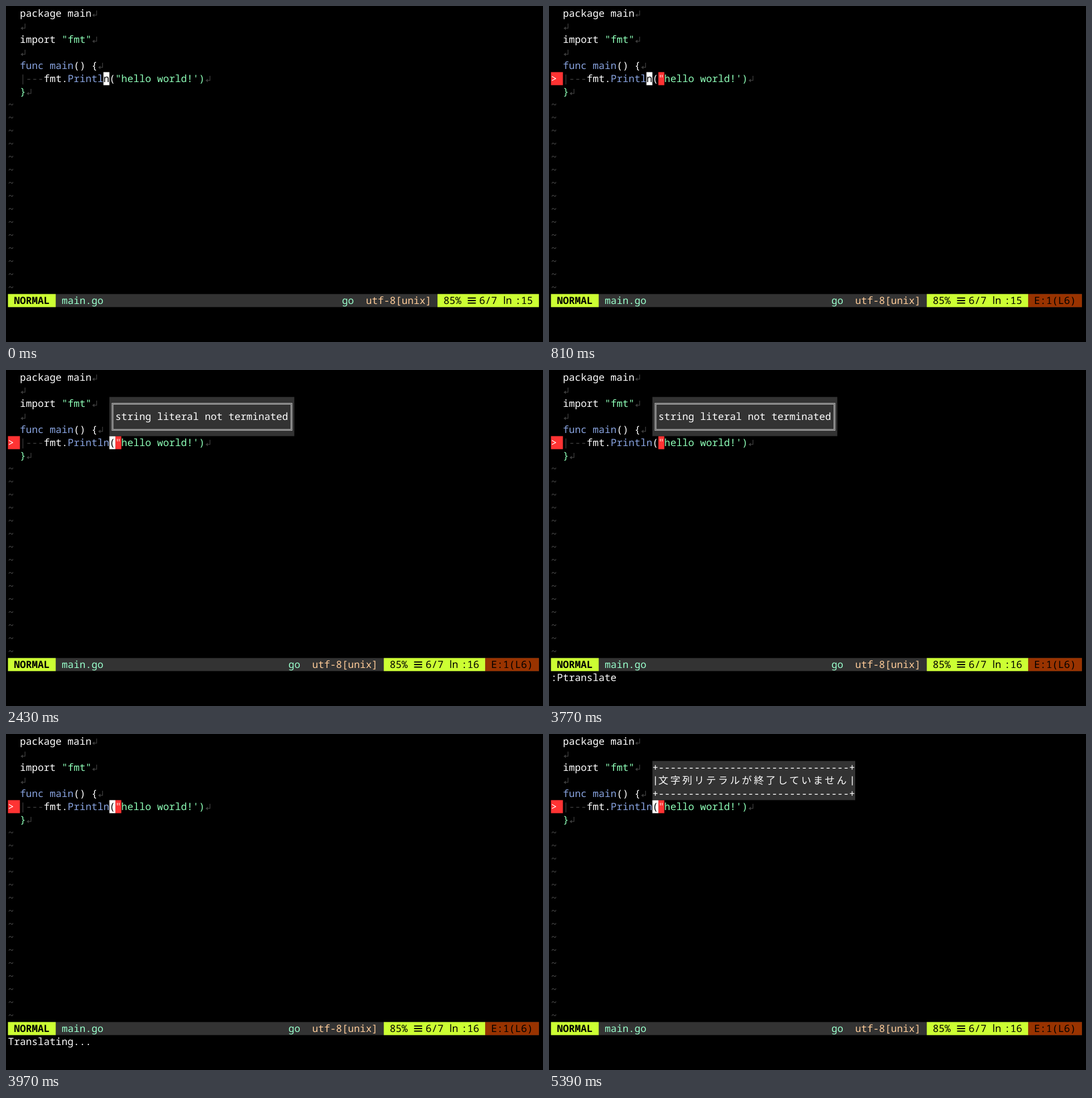
Animation, 947 px wide and 592 px high, one loop 7790 ms. Source, as an HTML page:

```html
<!DOCTYPE html>
<html lang="en">
<head>
<meta charset="utf-8">
<title>Editor popup translation</title>
<style>
  html, body { margin: 0; width: 100%; height: 100%; overflow: hidden; background: #000; }
  svg { display: block; width: 100%; height: 100%; }
  text {
    font: 17.53px "Noto Sans Mono", "DejaVu Sans Mono", monospace;
    white-space: pre;
    text-rendering: geometricPrecision;
  }
  .mode { font-weight: 600; }
  .cjk { font: 300 17.6px "Noto Sans CJK JP", "Noto Sans CJK", sans-serif; letter-spacing: 3.44px; }
  .ln { font: 18px "Noto Sans", "Open Sans", sans-serif; }
</style>
</head>
<body>
<svg id="stage" viewBox="0 0 947 592"></svg>
<script>
const LOOP = 7790;
const CELL = 10.52, ROW = 23, LEFT = 3.5, TOP = 1.5, BASE = 17.4;
const C = {
  white: '#fff', black: '#000', dim: '#3c3c3c', blue: '#88a3df', mint: '#8effb8',
  aqua: '#99ffcc', peach: '#ffcc99', lime: '#ccff33', bar: '#333', red: '#ff3333', rust: '#993300'
};
const stage = document.getElementById('stage');
const colX = c => LEFT + c * CELL;
const rowY = r => TOP + r * ROW;

function add(parent, tag, attrs, content) {
  const el = document.createElementNS('http://www.w3.org/2000/svg', tag);
  for (const k in attrs) el.setAttribute(k, attrs[k]);
  if (content) el.textContent = content;
  parent.appendChild(el);
  return el;
}
const group = (parent = stage) => add(parent, 'g', {});

function block(parent, row, col, cols, fill, rows = 1) {
  return add(parent, 'rect', {
    x: colX(col), y: rowY(row), width: cols * CELL, height: rows * ROW, fill
  });
}
function put(parent, row, col, str, fill, extra = {}) {
  return add(parent, 'text', { x: colX(col), y: rowY(row) + BASE, fill, ...extra }, str);
}
function lineEnd(row, col) {
  const x = colX(col), y = rowY(row);
  add(stage, 'path', {
    d: `M${x + 9} ${y + 6.5}v8.2h-5`, fill: 'none', stroke: C.dim, 'stroke-width': 1.3
  });
  add(stage, 'path', { d: `M${x + 1.2} ${y + 14.7}l4 -3v6z`, fill: C.dim });
}

// Code buffer: row, column, text, colour
[
  [0, 2, 'package main', C.white],
  [2, 2, 'import', C.white], [2, 9, '"fmt"', C.mint],
  [4, 2, 'func main', C.blue], [4, 11, '() {', C.white],
  [5, 2, '|---', C.dim], [5, 6, 'fmt.', C.white], [5, 10, 'Println', C.blue],
  [5, 17, '(', C.white], [5, 18, '"hello world!\')', C.mint],
  [6, 2, '}', C.mint]
].forEach(([r, c, s, fill]) => put(stage, r, c, s, fill));
[[0, 14], [1, 2], [2, 14], [3, 2], [4, 15], [5, 33], [6, 3]].forEach(p => lineEnd(...p));
for (let r = 7; r < 22; r++) put(stage, r, 0, '~', '#484848');

// Lint error marks
const lint = group();
block(lint, 5, 0, 2, C.red);
put(lint, 5, 0, '>', C.white);
block(lint, 5, 18, 1, C.red);
put(lint, 5, 18, '"', '#ffd8d0');

function makeCursor(col, ch) {
  const g = group();
  block(g, 5, col, 1, C.white);
  put(g, 5, col, ch, C.black);
  return g;
}
const cursorN = makeCursor(16, 'n');
const cursorParen = makeCursor(17, '(');

// Status line
block(stage, 22, 0, 89, C.bar);
block(stage, 22, 0, 8, C.lime);
put(stage, 22, 1, 'NORMAL', C.black, { class: 'mode' });
put(stage, 22, 9, 'main.go', C.aqua);

const right = group();
put(right, 22, 56, 'go', C.aqua);
put(right, 22, 60, 'utf-8[unix]', C.peach);
block(right, 22, 72, 17, C.lime);
put(right, 22, 73, '85%', C.black);
for (const dy of [7, 11.5, 16]) {
  add(right, 'rect', { x: colX(77) + 0.8, y: rowY(22) + dy - 1, width: 14.2, height: 2, fill: C.black });
}
put(right, 22, 79, '6/7', C.black);
put(right, 22, 83, 'ln', C.black, { class: 'ln' });
const column = put(right, 22, 85, ':15', C.black);

const errors = group();
block(errors, 22, 80, 9, C.rust);
put(errors, 22, 81, 'E:1(L6)', C.black);

// Message popup with a double border
const message = group();
block(message, 2, 17, 31, C.bar, 3);
for (const [stroke, width] of [['#b4b4b4', 3], ['#5c5c5c', 1]]) {
  add(message, 'rect', {
    x: 187.9, y: 59.5, width: 315.5, height: 46, fill: 'none', stroke, 'stroke-width': width
  });
}
put(message, 3, 18, 'string literal not terminated', C.white);

// Translated popup
const translated = group();
block(translated, 2, 17, 34, C.bar, 3);
const edge = '+' + '-'.repeat(32) + '+';
put(translated, 2, 17, edge, C.white);
put(translated, 4, 17, edge, C.white);
for (const c of [17, 50]) {
  add(translated, 'rect', { x: colX(c) + 4.6, y: rowY(3) + 4, width: 1.4, height: 16, fill: C.white });
}
put(translated, 3, 18, '文字列リテラルが終了していません', C.white, { class: 'cjk' });

const command = put(stage, 23, 0, '', C.white);

const show = (el, on) => el.setAttribute('visibility', on ? 'visible' : 'hidden');
const within = (t, a, b) => t >= a && t < b;

function draw(t) {
  const linted = t >= 810, moved = t >= 1900;
  show(lint, linted);
  show(errors, linted);
  right.setAttribute('transform', `translate(${linted ? -9 * CELL : 0} 0)`);
  column.textContent = moved ? ':16' : ':15';
  show(cursorN, !moved);
  show(cursorParen, moved && !within(t, 3770, 3970));
  show(message, within(t, 2430, 3970));
  show(translated, t >= 5390);
  command.textContent = within(t, 3770, 3870) ? ':Ptranslate'
    : within(t, 3870, 5390) ? 'Translating...' : '';
}

const start = performance.now();
function tick() {
  draw((performance.now() - start) % LOOP);
  requestAnimationFrame(tick);
}
draw(0);
requestAnimationFrame(tick);
</script>
</body>
</html>
```
